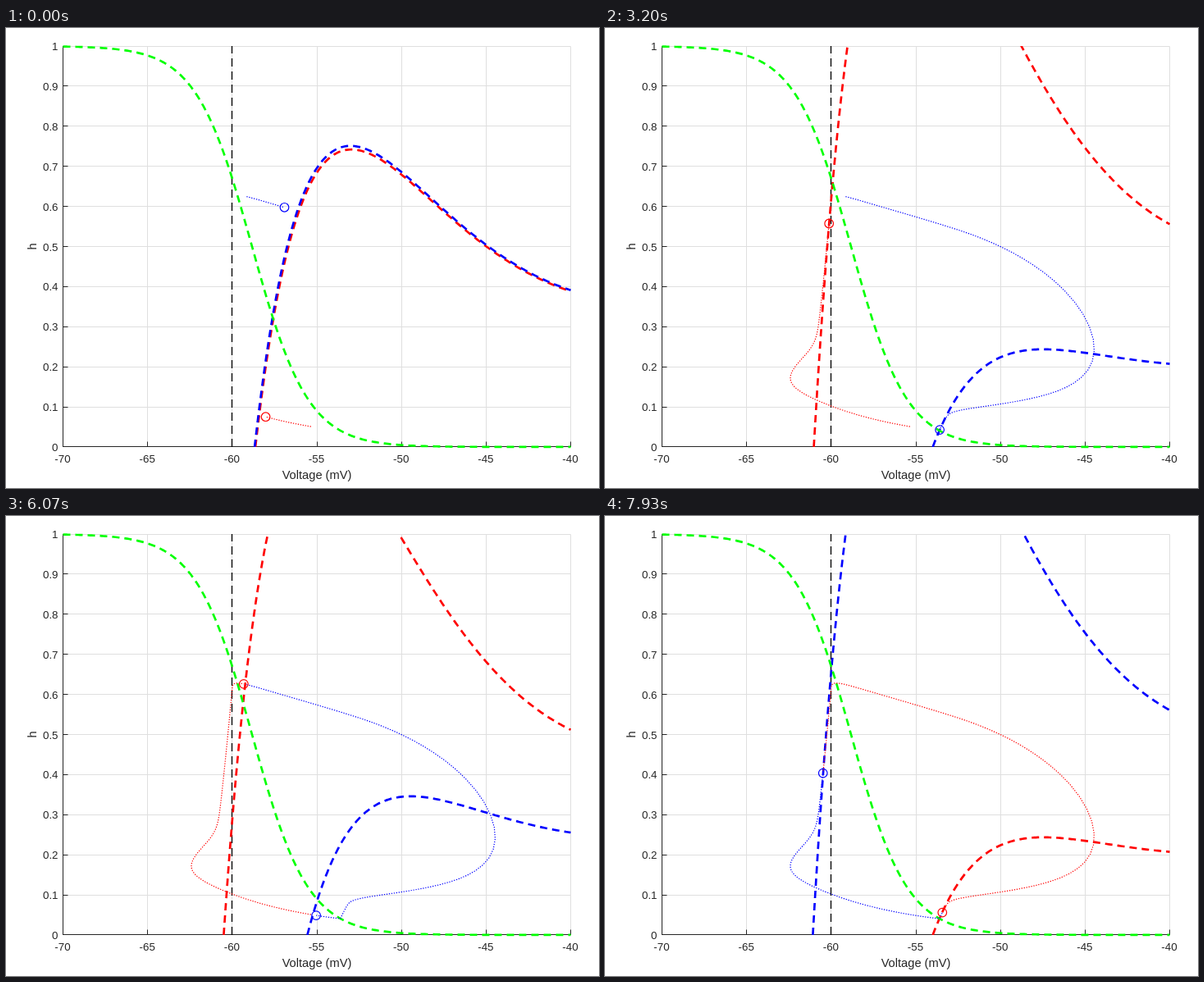
Write an HTML page with a canvas that moves like this. It is 723x561 px and loops after 8 s.

```html
<!DOCTYPE html>
<html lang="en">
<head>
<meta charset="utf-8">
<title>Phase plane of two coupled cells</title>
<style>
  html, body { margin: 0; width: 100%; height: 100%; overflow: hidden; background: #fff; }
  canvas, svg { position: absolute; left: 0; top: 0; width: 723px; height: 561px; }
  text { font-family: "Liberation Sans", Arial, sans-serif; font-size: 13.33px; fill: #262626; }
  .label { font-size: 14.67px; }
</style>
</head>
<body>
<canvas id="plot" width="723" height="561"></canvas>
<svg id="labels" viewBox="0 0 723 561"></svg>
<script>
const LOOP = 8000, STEP = 200 / 3;
const HALF = 6500, CYCLE = 2 * HALF;   // the cells run half a cycle apart
const START = -365, TRAIL = 6450;
const BOX = { l: 69.5, r: 688.5, t: 22.05, b: 510.95 };
const RED = '#f00', BLUE = '#00f', GREEN = '#0f0', INK = '#262626', GRID = '#dfdfdf';

const ctx = document.getElementById('plot').getContext('2d');
const px = v => BOX.l + (v + 70) / 30 * (BOX.r - BOX.l);
const py = h => BOX.b - h * (BOX.b - BOX.t);
const snap = n => Math.floor(n) + 0.5;

// Membrane model: leak, persistent sodium with inactivation h, inhibitory synapse.
// Conductances are relative to the leak, times in ms, potentials in mV.
const LEAK = -54, SODIUM = 50, SYNAPSE = -70, THRESHOLD = -60;
const G_SODIUM = 1.5, G_SYNAPSE = 1.875;
const TAU_V = 53, TAU_H = 2750, TAU_S = 80, RELEASE = 0.112;
const H_MID = -58.83, H_WIDTH = 1.655;
const PHASE_V = -58.03;                // falling potential that marks time zero

const hInf = v => 1 / (1 + Math.exp((v - H_MID) / H_WIDTH));
const tauH = v => TAU_H / Math.cosh((v - H_MID) / (2 * H_WIDTH));
const sodium = v => G_SODIUM * (SODIUM - v) / (1 + Math.exp(-(v + 40) / 5));
const outward = (v, g) => v - LEAK + g * (v - SYNAPSE);
const vNull = (v, g) => outward(v, g) / sodium(v);

function advance(cell, g) {
  const { v, h, s } = cell;
  const drive = RELEASE * Math.max(0, v - THRESHOLD);
  return {
    v: v + (sodium(v) * h - outward(v, g)) / TAU_V,
    h: h + (hInf(v) - h) / tauH(v),
    s: s + (drive * (1 - s) - s) / TAU_S
  };
}

// Runs the pair until it settles and returns one full cycle of a cell
function settle() {
  let a = { v: -55.25, h: 0.0545, s: 0.35 };
  let b = { v: -59.14, h: 0.621, s: 0.06 };
  const log = [], marks = [];
  for (let i = 0; i < 60000; i++) {
    const g = G_SYNAPSE * b.s;
    log.push({ v: a.v, h: a.h, g });
    const next = advance(a, g);
    b = advance(b, G_SYNAPSE * a.s);
    if (a.v >= PHASE_V && next.v < PHASE_V) marks.push(i);
    a = next;
  }
  return log.slice(...marks.slice(-2));
}
const cycle = settle();

function cellAt(t) {
  const n = cycle.length;
  const pos = ((t / CYCLE) % 1 + 1) % 1 * n;
  const i = Math.floor(pos), f = pos - i;
  const p = cycle[i % n], q = cycle[(i + 1) % n];
  const mix = key => p[key] + (q[key] - p[key]) * f;
  return { x: px(mix('v')), y: py(mix('h')), g: mix('g') };
}

function stroke(color, width, dash = []) {
  ctx.strokeStyle = color;
  ctx.lineWidth = width;
  ctx.setLineDash(dash);
  ctx.stroke();
}

function line(x1, y1, x2, y2, color, width, dash) {
  ctx.beginPath();
  ctx.moveTo(x1, y1);
  ctx.lineTo(x2, y2);
  stroke(color, width, dash);
}

function graph(f, from, color) {
  ctx.beginPath();
  for (let v = from; v < -40; v += 0.1) ctx.lineTo(px(v), py(f(v)));
  ctx.lineTo(px(-40), py(f(-40)));
  stroke(color, 2.67, [9, 6]);
}

function nullcline(g, color) {
  const zero = (LEAK + g * SYNAPSE) / (1 + g);
  graph(v => vNull(v, g), zero, color);
}

function trail(from, to, color) {
  ctx.beginPath();
  for (let t = from; t < to; t += 8) {
    const { x, y } = cellAt(t);
    ctx.lineTo(x, y);
  }
  const end = cellAt(to);
  ctx.lineTo(end.x, end.y);
  stroke(color, 1.2, [1.3, 1.7]);
}

function marker({ x, y }, color) {
  ctx.beginPath();
  ctx.arc(x, y, 5.3, 0, 2 * Math.PI);
  stroke(color, 1.2);
}

function axes() {
  const xs = Array.from({ length: 7 }, (_, i) => snap(px(-70 + 5 * i)));
  const ys = Array.from({ length: 11 }, (_, i) => snap(py(i / 10)));
  const left = xs[0], right = xs[6], bottom = ys[0], top = ys[10];
  xs.forEach(x => line(x, top, x, bottom, GRID, 1));
  ys.forEach(y => line(left, y, right, y, GRID, 1));
  line(left, top - .5, left, bottom + .5, INK, 1);
  line(left, bottom, right + .5, bottom, INK, 1);
  xs.forEach(x => line(x, bottom, x, bottom - 6, INK, 1));
  ys.forEach(y => line(left, y, left + 6, y, INK, 1));
}

function draw(t) {
  const red = cellAt(t), blue = cellAt(t + HALF);
  ctx.fillStyle = '#fff';
  ctx.fillRect(0, 0, 723, 561);
  axes();

  ctx.save();
  ctx.beginPath();
  ctx.rect(69, 22, 620, 489);
  ctx.clip();
  const x = snap(px(THRESHOLD));
  line(x, BOX.b, x, BOX.t, '#000', 1.33, [10, 6]);
  nullcline(red.g, RED);
  nullcline(blue.g, BLUE);
  ctx.restore();
  graph(hInf, -70, GREEN);

  const from = Math.max(START, t - TRAIL);
  trail(from, t, RED);
  trail(from + HALF, t + HALF, BLUE);
  marker(red, RED);
  marker(blue, BLUE);
}

function label(text, x, y, anchor, attrs = {}) {
  const el = document.createElementNS('http://www.w3.org/2000/svg', 'text');
  Object.entries({ x, y, 'text-anchor': anchor, ...attrs })
    .forEach(([key, value]) => el.setAttribute(key, value));
  el.textContent = text;
  document.getElementById('labels').append(el);
}
for (let v = -70; v <= -40; v += 5) label(v, px(v) - .5, 530, 'middle');
for (let i = 0; i <= 10; i++) label(i / 10, 63.5, Math.round(py(i / 10) + 5), 'end');
label('Voltage (mV)', 379, 550, 'middle', { class: 'label' });
label('h', 37, 266.5, 'middle', { class: 'label', transform: 'rotate(-90 37 266.5)' });

let begin, shown = 0;
function tick(now) {
  begin ??= now;
  const step = Math.floor(((now - begin) % LOOP + 5) / STEP) % 120;
  if (step !== shown) draw(step * STEP);
  shown = step;
  requestAnimationFrame(tick);
}
draw(0);
requestAnimationFrame(tick);
</script>
</body>
</html>
```
